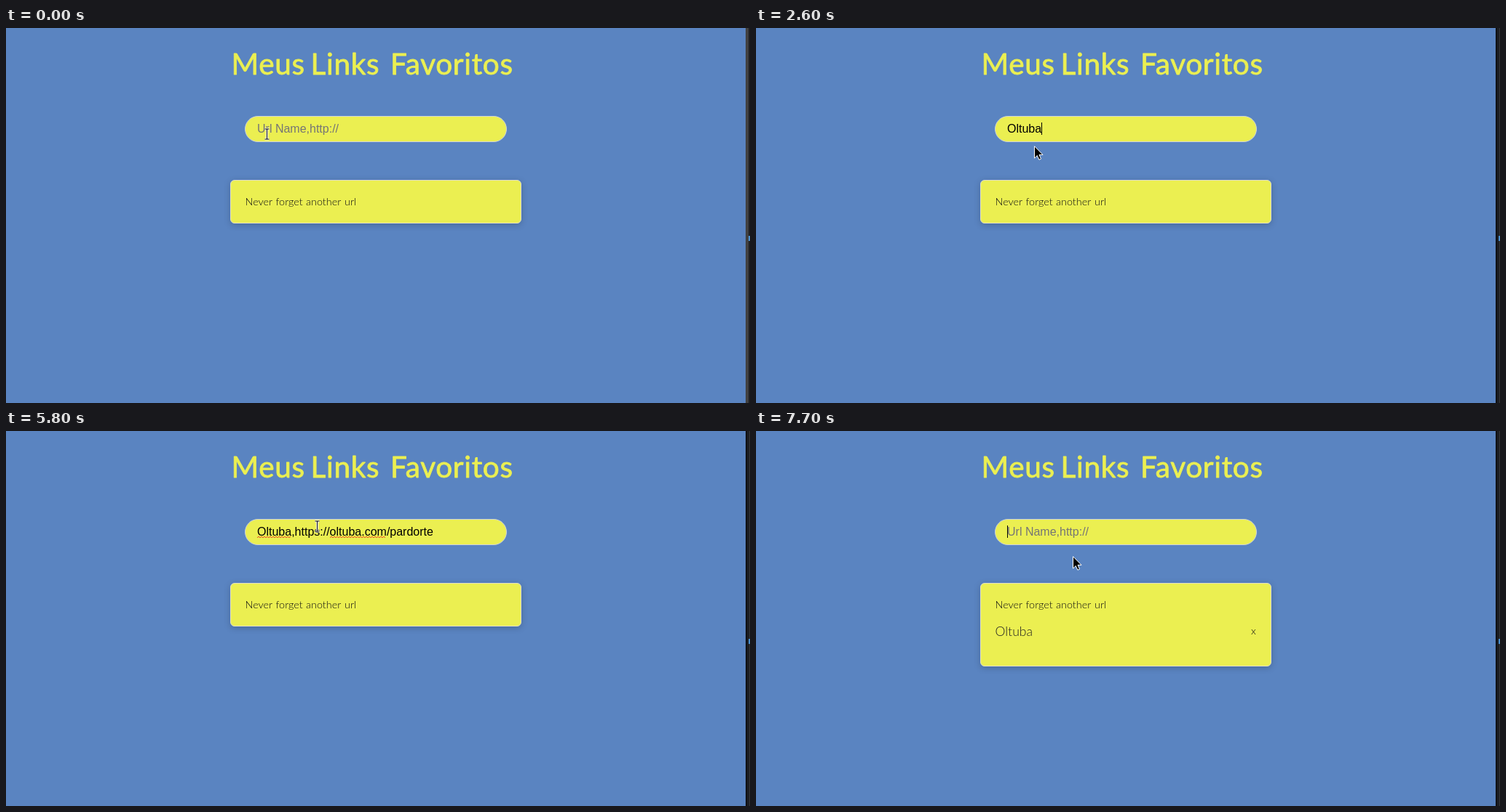
An HTML page for the animation above (8 s loop, 1022x516 px).

```html
<!DOCTYPE html>
<html lang="pt">
<head>
<meta charset="utf-8">
<title>Meus Links Favoritos</title>
<style>
  html, body { margin: 0; width: 100%; height: 100%; overflow: hidden; background: #5a84c1; }
  svg { display: block; width: 1022px; height: 516px; }
  text { white-space: pre; }
  .title { font: 400 40.5px Lato, sans-serif; fill: #ebef51; stroke: #ebef51; stroke-width: .8; stroke-linejoin: round; letter-spacing: .7px; }
  .note { font: 300 14.4px Lato, sans-serif; fill: #111; }
  .link { font: 300 17.6px Lato, sans-serif; fill: #222; }
  .field { font: 16px "Liberation Sans", Arial, sans-serif; }
  .card { fill: #ebef51; stroke: #dfdfc8; filter: drop-shadow(0 2px 4px rgba(0, 0, 0, .2)); }
</style>
</head>
<body>
<svg viewBox="0 0 1022 516">
  <rect width="1022" height="516" fill="#5a84c1"/>
  <g id="edge">
    <rect id="bar" x="1016" width="4" height="516"/>
    <rect id="rim" x="1020" width="2" height="516"/>
    <rect id="seam" x="1018" width="1" height="516"/>
    <rect x="1020" y="286" width="2" height="7" fill="#4a90cf"/>
  </g>
  <text class="title" y="64"><tspan x="309.5">Meus</tspan><tspan x="418.5">Links</tspan><tspan x="528">Favoritos</tspan></text>
  <rect x="328.5" y="121.5" width="359" height="35" rx="17.5" fill="#ebef51" stroke="#ced4da"/>
  <text id="value" class="field" x="345" y="144"></text>
  <path id="waves" fill="none" stroke="#e8391c" stroke-width=".9"/>
  <rect id="caret" y="130" width="1" height="17"/>
  <rect id="card" class="card" x="308.5" y="209.5" width="399" rx="5.5"/>
  <text class="note" y="244"><tspan x="328.5">Never</tspan><tspan x="370.5">forget</tspan><tspan x="412">another</tspan><tspan x="465">url</tspan></text>
  <g id="item">
    <text class="link" x="328.5" y="282">Oltuba</text>
    <text class="note" x="680" y="280">x</text>
  </g>
  <g id="arrow">
    <path d="M.5 .7V17.2L4.2 13.5L6.9 19.3L9.5 18.1L7 12.4H12Z" fill="#000" stroke="#fff"/>
  </g>
  <g id="beam" fill="none">
    <path d="M-2.5 -7H3.5M-2.5 7H3.5M.5 -7V7" stroke="#fff" stroke-width="3" opacity=".9"/>
    <path d="M-2.5 -7H3.5M-2.5 7H3.5M.5 -7V7" stroke="#000"/>
  </g>
</svg>
<script>
const LOOP = 8000, LEFT = 345;
const NAME = "Oltuba", HOST = "oltuba.com", PATH = "/pardorte";
const HINT = "Url Name,http://";
const SECURE = NAME + ",https://" + HOST + PATH;
const PLAIN = NAME + ",http://" + HOST + PATH;

// [time, content]
const typed = [
  [0, ""], [1600, NAME.slice(0, 1)], [1900, NAME.slice(0, 2)], [2100, NAME.slice(0, 3)],
  [2400, NAME.slice(0, 4)], [2500, NAME.slice(0, 5)], [2600, NAME],
  [4000, NAME + ","], [4900, SECURE], [6800, PLAIN], [7700, ""]
];
// [time, visible]
const blink = [
  [0, 0], [400, 1], [900, 0], [1500, 1], [3300, 0], [3900, 1], [4600, 0],
  [4900, 1], [5500, 0], [5900, 1], [6500, 0], [6800, 1], [6900, 0], [7400, 1]
];
// [time, shape, x, y]
const pointer = [
  [0, "beam", 358, 146], [200, "beam", 359, 145], [400, "beam", 367, 150],
  [500, "arrow", 378, 159], [600, "arrow", 382, 162],
  [5200, "arrow", 386, 169], [5300, "arrow", 402, 178], [5400, "arrow", 418, 172],
  [5500, "arrow", 427, 160], [5600, "beam", 430, 146], [5700, "beam", 428, 136],
  [5800, "beam", 427, 131], [5900, "beam", 430, 134], [6000, "beam", 432, 136],
  [6100, "beam", 433, 146], [6200, "arrow", 434, 165], [6300, "arrow", 435, 178],
  [6400, "arrow", 435, 175], [6500, "arrow", 435, 172]
];

const $ = id => document.getElementById(id);
const set = (id, attrs) => { for (const k in attrs) $(id).setAttribute(k, attrs[k]); };
const show = (id, on) => set(id, { visibility: on ? "visible" : "hidden" });
const at = (list, t) => list.reduce((last, row) => row[0] <= t ? row : last);

const pen = document.createElement("canvas").getContext("2d");
pen.font = '16px "Liberation Sans", Arial, sans-serif';
const xAfter = s => LEFT + pen.measureText(s).width;

function wave(from, to) {
  let d = `M${from} 146.8`;
  for (let x = from + 2, up = true; x <= to; x += 2, up = !up) d += `L${x} ${up ? 145.2 : 146.8}`;
  return d;
}

function squiggles(text, t) {
  if (!text || t < 3700) return "";
  const start = text.indexOf(HOST);
  let d = wave(LEFT, xAfter(NAME));
  if (start > 0) d += wave(Math.round(xAfter(text.slice(0, start))), xAfter(text.slice(0, start + HOST.length)));
  return d;
}

function caretX(text, t) {
  const end = t >= 5900 && text ? text.indexOf(":") : text.length;
  return Math.floor(xAfter(text.slice(0, end)));
}

function draw(t) {
  const text = at(typed, t)[1];
  const [, shape, x, y] = at(pointer, t);
  const focused = t >= 400, saved = t >= 7700;

  $("value").textContent = text || HINT;
  set("value", { fill: text ? "#000" : "#757575" });
  set("waves", { d: squiggles(text, t) });
  set("caret", { x: caretX(text, t) });
  show("caret", at(blink, t)[1]);

  set("card", { height: saved ? 114 : 59 });
  show("item", saved);

  set("bar", { fill: focused ? "#0e0f14" : "#414141" });
  set("rim", { fill: focused ? "#2c2d30" : "#202124" });
  set("seam", { fill: focused ? "#24252a" : "#414141" });

  for (const id of ["arrow", "beam"]) show(id, id === shape);
  set(shape, { transform: `translate(${x} ${y})` });
}

const begin = performance.now();
function tick() {
  draw((performance.now() - begin) % LOOP);
  requestAnimationFrame(tick);
}
tick();
</script>
</body>
</html>
```
